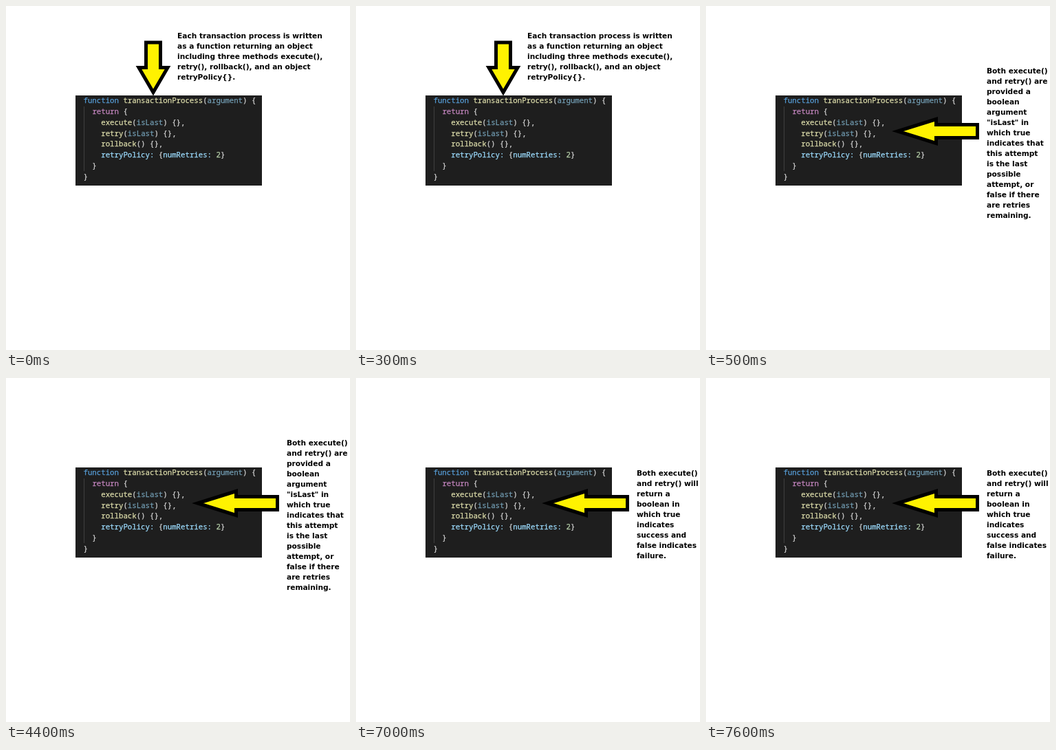
An HTML page for the animation above (8 s loop, 500 px wide and 500 px high).

```html
<!DOCTYPE html>
<html>
<head>
<meta charset="utf-8">
<style>
  html, body { margin: 0; width: 100%; height: 100%; overflow: hidden; background: #fff; }
  svg { display: block; width: 100vw; height: 100vh; }
  text { white-space: pre; }
  #code { font: 10.72px "Noto Sans Mono", monospace; color: #d4d4d4; }
  #code text, #code tspan { fill: currentColor; stroke: currentColor; stroke-width: .25; }
  .keyword { color: #569cd6; }
  .control { color: #c586c0; }
  .method { color: #dcdcaa; }
  .unused { color: #729db3; }
  .property { color: #9cdcfe; }
  .number { color: #b5cea8; }
  #caption { font: bold 10.6px "DejaVu Sans", sans-serif; }
  #arrow { fill: #fff200; stroke: #000; stroke-width: 5; }
</style>
</head>
<body>
<svg viewBox="0 0 500 500">
  <rect x="101" y="130" width="271" height="131" fill="#1e1e1e"/>
  <path d="M113.5 146V240" stroke="#404040"/>
  <g id="code"></g>
  <path id="arrow"/>
  <g id="caption"></g>
</svg>
<script>
const LOOP = 8000;
const DOWN = "M203.5 53H224.5V89.5H235L214 125.5L193 89.5H203.5Z";
const LEFT = "M394.5 172.5H334.5V164.5L278.5 182L334.5 199.5V191.5H394.5Z";

const scenes = [
  { start: 0, arrow: DOWN, x: 249, y: 47, lines: [
    "Each transaction process is written", "as a function returning an object",
    "including three methods execute(),", "retry(), rollback(), and an object", "retryPolicy{}."] },
  { start: 500, arrow: LEFT, x: 408, y: 98, lines: [
    "Both execute()", "and retry() are", "provided a", "boolean", "argument", '"isLast" in',
    "which true", "indicates that", "this attempt", "is the last", "possible",
    "attempt, or", "false if there", "are retries", "remaining."] },
  { start: 7000, arrow: LEFT, x: 408, y: 142, lines: [
    "Both execute()", "and retry() will", "return a", "boolean in", "which true",
    "indicates", "success and", "false indicates", "failure."] }
];

const paint = (kind, text) => `<tspan class="${kind}">${text}</tspan>`;
const method = name => paint("method", name);
const isLast = paint("unused", "isLast");

const codeLines = [
  `${paint("keyword", "function")} ${method("transactionProcess")}(${paint("unused", "argument")}) {`,
  `  ${paint("control", "return")} {`,
  `    ${method("execute")}(${isLast}) {},`,
  `    ${method("retry")}(${isLast}) {},`,
  `    ${method("rollback")}() {},`,
  `    ${paint("property", "retryPolicy:")} {${paint("property", "numRetries:")} ${paint("number", "2")}}`,
  "  }",
  "}"
];

const textLines = (lines, x, y, spacing) =>
  lines.map((line, i) => `<text x="${x}" y="${y + i * spacing}">${line}</text>`).join("");

const code = document.getElementById("code");
const arrow = document.getElementById("arrow");
const caption = document.getElementById("caption");
code.innerHTML = textLines(codeLines, 112.5, 141, 15.85);

let shown;
function draw() {
  const time = performance.now() % LOOP;
  const scene = scenes.filter(s => s.start <= time).pop();
  if (scene !== shown) {
    shown = scene;
    arrow.setAttribute("d", scene.arrow);
    caption.innerHTML = textLines(scene.lines, scene.x, scene.y, 15);
  }
  requestAnimationFrame(draw);
}
draw();
</script>
</body>
</html>
```
